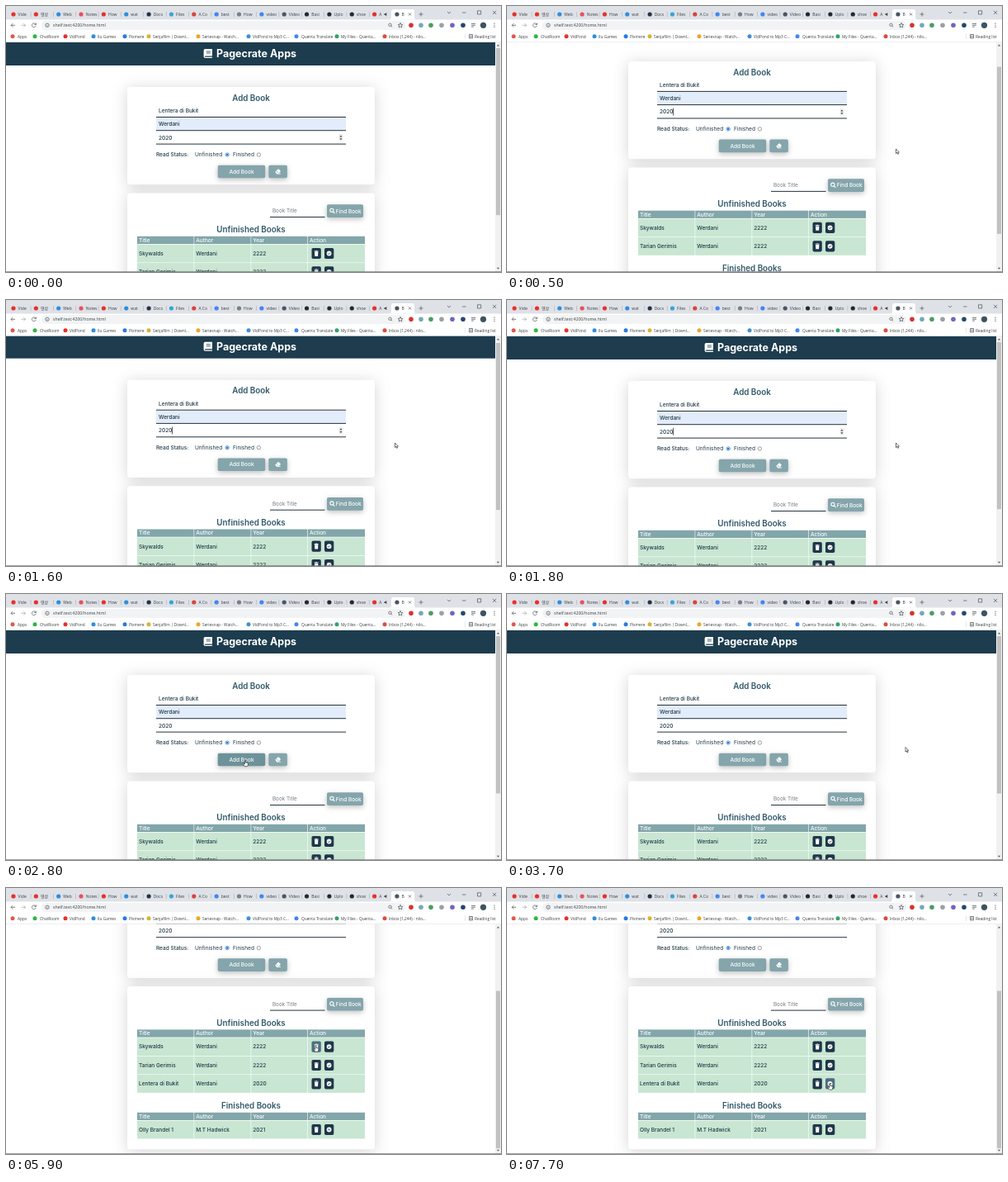
These frames come from a looping animation (600 by 322 pixels, 8 s). An HTML page:

```html
<!DOCTYPE html>
<html lang="en">
<head>
<meta charset="utf-8">
<title>Book list</title>
<style>
  html, body { margin: 0; width: 100%; height: 100%; overflow: hidden; background: #fff; }
  svg { display: block; }
  text { white-space: pre; }
  #page { font-family: Inter, "Noto Sans", sans-serif; font-size: 6.5px; font-weight: 500; fill: #1f3846; }
  #chrome { font-family: "Open Sans", "Noto Sans CJK KR", "Noto Sans CJK", sans-serif; font-size: 5px; fill: #3c4043; }
  .card { fill: #fff; filter: drop-shadow(0 2px 9px rgba(0, 0, 0, .17)); }
  .title { font-size: 9.8px; font-weight: 600; fill: #32596a; text-anchor: middle; }
  .light { fill: #fff; }
  .main rect { fill: #84a5ab; filter: drop-shadow(0 2px 3px rgba(0, 0, 0, .25)); }
  .main.hot rect { fill: #6d9299; }
  .small rect { fill: #1f364a; }
  .small.hot rect { fill: #4c6f80; }
  .line { fill: none; stroke: #5f6368; stroke-width: .8; }
  #cursor { pointer-events: none; }
</style>
</head>
<body>
<svg id="stage" width="600" height="322" viewBox="0 0 600 322" xmlns="http://www.w3.org/2000/svg"></svg>
<script>
const LOOP = 8000, ROW = 22.4, TOP = 43.5, VIEW = 278, BASE_SCROLL = 85;
const ADDED_AT = 2700;

const rect = (x, y, w, h, fill, extra = '') =>
  `<rect x="${x}" y="${y}" width="${w}" height="${h}" fill="${fill}" ${extra}/>`;
const text = (x, y, s, extra = '') => `<text x="${x}" y="${y}" ${extra}>${s}</text>`;
const dot = (x, y, r, fill, extra = '') => `<circle cx="${x}" cy="${y}" r="${r}" fill="${fill}" ${extra}/>`;
const path = (d, extra = 'class="line"') => `<path d="${d}" ${extra}/>`;
const button = (x, y, w, h, kind, inner) =>
  `<g class="btn ${kind}">${rect(x, y, w, h, '', 'rx="1.8"')}${inner}</g>`;

// Book page
const trash = (x, y) => `<g transform="translate(${x} ${y})" fill="#fff">
  <path d="M-2.5-3.1h1.6l.3-.5h1.2l.3.5h1.6v.8h-5zM-2.2-1.9h4.4l-.3 4.8q0 .5-.6.5h-2.6q-.6 0-.6-.5z"/></g>`;
const badge = (x, y, mark) => dot(x, y, 2.9, '#fff') +
  path(`M${x} ${y}${mark}`, 'fill="none" stroke="#1f364a" stroke-width=".9"');
const CHECK = 'm-1.5 0l1.1 1.1l1.9-2', CROSS = 'm-1.1-1.1l2.2 2.2m0-2.2l-2.2 2.2';

const columns = [[159, 68.6], [228.2, 68.4], [297.2, 68.2], [366, 69]];
const cells = (y, h, fill, values, baseline, extra) => columns.map(([x, w], i) =>
  rect(x, y, w, h, fill) + text(x + 2, y + baseline, values[i] ?? '', extra)).join('');
const tableHead = y => cells(y, 9.2, '#82a6aa', ['Title', 'Author', 'Year', 'Action'], 7, 'class="light"');
const bookRow = (y, book, mark) => cells(y, 21.8, '#c8e6d2', book, 13.2) +
  button(370.5, y + 4.2, 11.3, 13.2, 'small', trash(376.2, y + 10.8)) +
  button(386, y + 4.2, 11.3, 13.2, 'small', badge(391.6, y + 10.8, mark));

const radio = (x, on) => dot(x, 180, 2.2, '#fff', `stroke="${on ? '#2374d9' : '#777'}" stroke-width=".7"`) +
  (on ? dot(x, 180, 1.3, '#2374d9') : '');
const field = (y, value) => text(185, y, value) + rect(182, y + 5, 230, 1, '#26343c');

const page = `<g id="page">
  ${rect(0, 44, 593, 28, '#1d3c4e')}
  <path d="M241.5 52h8.5v8.6h-8.2q-.9 0-.9.6t.9.6h8.2v1.2h-8.5q-1.9 0-1.9-1.8v-7.2q0-2 1.9-2z" fill="#fff"/>
  ${path('M242.8 55h5M242.8 57h5', 'stroke="#1d3c4e" stroke-width=".8"')}
  ${text(255, 62.4, 'Pagecrate Apps', 'class="light" style="font-size:12.5px;font-weight:700"')}
  ${rect(147, 98, 300, 118.3, '#fff', 'rx="4" class="card"')}
  ${text(297, 114.8, 'Add Book', 'class="title"')}
  ${rect(182, 135, 230, 16, '#e3ecfa')}
  ${field(129, 'Lentera di Bukit')}${field(145.2, 'Werdani')}${field(161.6, '2020')}
  <g id="spinner">${rect(403.5, 155, 5, 8.6, '#eee')}
    <path d="M404.4 158.5l1.5-2 1.5 2zM404.4 160.3l1.5 2 1.5-2z" fill="#444"/></g>
  ${rect(201.3, 154.7, .7, 9, '#111', 'id="caret"')}
  ${text(182, 182.3, 'Read Status:')}${text(229, 182.3, 'Unfinished', 'font-weight="400"')}${radio(268.2, true)}
  ${text(275, 182.3, 'Finished', 'font-weight="400"')}${radio(306.4, false)}
  ${button(256.7, 192.7, 57.5, 15.6, 'main', text(285.5, 202.8, 'Add Book', 'class="light" text-anchor="middle"'))}
  ${button(318.3, 192.7, 22.6, 15.6, 'main',
    '<path d="M326.3 200.8l3.3-3.3q.5-.5 1 0l2 2q.5.5 0 1l-2 2h2.2v.9h-4.6z" fill="#fff"/>' +
    path('M327.6 199.6l3 3', 'stroke="#84a5ab" stroke-width=".7"'))}
  ${rect(147, 226.5, 300, 174.7, '#fff', 'rx="4" class="card" id="listCard"')}
  ${text(323, 250.3, 'Book Title', 'style="font-size:6.3px;font-weight:400;fill:#727a80"')}
  ${rect(320, 255, 66.5, 1, '#26343c')}
  ${button(389, 240.3, 44, 15.7, 'main',
    path('M396.6 249.2l1.8 1.8M397 247.3a2.1 2.1 0 1 0-4.2 0a2.1 2.1 0 1 0 4.2 0', 'fill="none" stroke="#fff" stroke-width="1.1"') +
    text(399.8, 250.5, 'Find Book', 'class="light"'))}
  ${text(297, 274.2, 'Unfinished Books', 'class="title"')}
  ${tableHead(278.8)}
  ${bookRow(288.7, ['Skywalds', 'Werdani', '2222'], CHECK)}
  ${bookRow(288.7 + ROW, ['Tarian Gerimis', 'Werdani', '2222'], CHECK)}
  <g id="newBook">${bookRow(288.7 + 2 * ROW, ['Lentera di Bukit', 'Werdani', '2020'], CHECK)}</g>
  <g id="finished">
    ${text(297, 352, 'Finished Books', 'class="title"')}
    ${tableHead(356.8)}
    ${bookRow(366.7, ['Olly Brandel 1', 'M.T Hadwick', '2021'], CROSS)}
  </g>
</g>`;

// Browser frame
const RED = '#e8302a', BLUE = '#2d8ee0', INK = '#24292e', GREY = '#7a7f85';
const tabs = [['Vide', RED], ['영상', RED], ['Web', BLUE], ['Notes', '#e8505b'], ['How', RED], ['wat', BLUE],
  ['Docs', '#243447'], ['Files', '#35a5d8'], ['A Co', '#d9433c'], ['best', '#4285f4'], ['How', GREY], ['video', '#4285f4'],
  ['Video', '#4b5563'], ['Basi', INK], ['Uplo', INK], ['shoe', INK], ['A', RED], ['B', '#4b5563']];
const bookmarks = [[8, 14, 'Apps', '#e2574c'], [35, 41, 'ChatRoom', '#2bb741'], [72, 77, 'VidPond', RED],
  [106, 111, 'Ilu Games', BLUE], [144, 149, 'Pixmere', '#2779e5'], [173, 178, 'Senjafilm | Downl...', '#d8b13a'],
  [233, 238, 'Seriesnap - Watch...', '#eda52c'], [294, 299, 'VidPond to Mp3 C...', '#3f8fd4'],
  [352, 358, 'Quenta Translate', '#4285f4'], [401, 406, 'My Files - Quenta...', '#32a467'], [459, 464, 'Inbox (1,244) - nilo...', '#dc4a3d']];
const extensions = [[491, '#d8322f'], [503, '#74a8bd'], [515, '#4b9d63'], [528, '#9aa0a6'], [541, '#6d65c6'], [554, '#24486c']];

const chrome = `<g id="chrome">
  ${rect(0, 0, 600, 17, '#dee1e6')}${rect(0, 16.5, 600, 27, '#fff')}
  <path d="M464 16.6q3 0 3-3v-7q0-2.5 2.5-2.5h23q2.5 0 2.5 2.5v7q0 3 3 3z" fill="#fff"/>
  ${tabs.map(([label, color], i) => {
    const x = 9 + i * 27.35;
    return dot(x, 10, 2.6, color) + text(x + 5.6, 12, label) +
      (i < 16 ? rect(x + 20.8, 7, .5, 6, '#a5a9ae') : '');
  }).join('')}
  <path d="M458.5 9.2h1.2l1.6-1.3v4.4l-1.6-1.3h-1.2z" fill="#444"/>
  ${path('M488 8.5l3 3m0-3l-3 3M503 7.5v5M500.5 10h5M535 7l2 2 2-2M553 8h4.5M571.5 5.8h4.2v4.2h-4.2zM590 5.8l4.2 4.2m0-4.2l-4.2 4.2')}
  ${rect(43, 18, 441, 11, '#f1f3f4', 'rx="5.5"')}
  ${path('M11 23.3h-5m2.2-2.2l-2.2 2.2 2.2 2.2')}
  ${path('M18.5 23.3h5m-2.2-2.2l2.2 2.2-2.2 2.2', 'class="line" opacity=".5"')}
  ${path('M36 22.2a2.4 2.4 0 1 0 .2 1.7M36.4 20.5v2h-2')}
  ${dot(50, 23.3, 2.2, 'none', 'class="line"')}${rect(49.65, 22.9, .7, 1.5, '#5f6368')}
  ${text(57, 25.3, 'shelf.test:4200/home.html', 'style="font-size:5.2px"')}
  ${dot(465.5, 22.8, 1.7, 'none', 'class="line"')}${path('M466.7 24l1.4 1.4')}
  ${path('M478 20.4l.8 2 2.1.1-1.6 1.4.5 2.1-1.8-1.2-1.8 1.2.5-2.1-1.6-1.4 2.1-.1z')}
  ${extensions.map(([x, color]) => dot(x, 23.3, 2.8, color)).join('')}
  ${path('M564 21.5h5M564 23.3h5M564 25.1h3')}
  ${dot(578.5, 23.3, 3.6, '#3c5360')}
  ${[21.2, 23.3, 25.4].map(y => dot(592, y, .65, '#5f6368')).join('')}
  ${bookmarks.map(([x, tx, label, color]) => dot(x, 36.7, 2.5, color) + text(tx, 38.6, label, 'style="font-size:4.8px"')).join('')}
  ${rect(556.5, 33.5, .5, 6.5, '#c8ccd0')}
  ${path('M561.5 34.5h4v4.5h-4zM562.5 36h2M562.5 37.5h2')}${text(568, 38.6, 'Reading list', 'style="font-size:4.8px"')}
  ${rect(0, 43, 600, .5, '#dcdfe2')}
  ${rect(593, TOP, 7, 278.5, '#f1f1f1')}
  <path d="M594.8 48.5l1.7-2 1.7 2zM594.8 316.8l1.7 2 1.7-2z" fill="#606060"/>
  ${rect(594, 51, 5, 200, '#c1c1c1', 'id="thumb"')}
  ${rect(0, 321.3, 600, .7, '#777')}
</g>`;

const cursor = `<g id="cursor" stroke="#111" stroke-width=".6" fill="#fff" stroke-linejoin="round">
  <path id="arrow" d="M0 0v5.6l1.3-1.2.9 2 .9-.4-.9-1.9h1.7z"/>
  <path id="hand" d="M-.6.4q.6-.8 1.2 0v2.5l2.3.6q.7.2.6 1l-.4 2q-.2 1.2-1.3 1.2h-1.9q-.7 0-1.1-.7l-1.6-2.4q.5-1 1.4-.1l.8.6z"/>
</g>`;

stage.innerHTML = page + chrome + cursor;
const $ = id => document.getElementById(id);
const buttons = [...document.querySelectorAll('.btn')];

// Keys are [time, ...values]; ease shapes each segment.
const smooth = u => u * u * (3 - 2 * u);
const easeOut = u => 1 - (1 - u) ** 3;
function track(keys, t, ease) {
  let i = keys.findIndex(k => k[0] > t);
  if (i < 0) return keys.at(-1).slice(1);
  if (i === 0) return keys[0].slice(1);
  const [a, b] = [keys[i - 1], keys[i]];
  const u = ease((t - a[0]) / (b[0] - a[0]));
  return a.slice(1).map((v, n) => v + (b[n + 1] - v) * u);
}
const scrollKeys = [[470, 0], [690, BASE_SCROLL], [1150, BASE_SCROLL], [1750, 0],
  [3960, 0], [4150, BASE_SCROLL + ROW]];
const cursorKeys = [[100, 600, 335], [320, 471.5, 173], [1950, 471.5, 173], [2500, 290, 201], [3150, 290, 201],
  [3650, 483, 185.5], [4780, 483, 185.5], [5120, 225, 238], [5300, 166, 240], [5500, 230, 288], [5850, 375.5, 190.5],
  [6000, 375.5, 190.5], [6250, 391, 191], [6550, 391, 288], [6850, 391, 288], [7200, 376, 237], [7450, 391.5, 236.5]];

function draw(t) {
  const added = t >= ADDED_AT;
  const shift = added ? ROW : 0;
  const [scroll] = track(scrollKeys, t, easeOut);
  const [x, y] = track(cursorKeys, t, smooth);
  const pageHeight = VIEW + BASE_SCROLL + shift;

  $('page').setAttribute('transform', `translate(0 ${-scroll})`);
  $('newBook').style.display = added ? '' : 'none';
  $('finished').setAttribute('transform', `translate(0 ${shift})`);
  $('listCard').setAttribute('height', 174.7 + shift);
  $('spinner').style.display = added ? 'none' : '';
  $('caret').style.display = !added && t % 1000 >= 500 ? '' : 'none';
  $('thumb').setAttribute('y', 51 + 264 * scroll / pageHeight);
  $('thumb').setAttribute('height', 264 * VIEW / pageHeight);

  const hovered = document.elementFromPoint(x, y)?.closest('.btn');
  buttons.forEach(b => b.classList.toggle('hot', b === hovered));
  $('cursor').setAttribute('transform', `translate(${x} ${y})`);
  $('arrow').style.display = hovered ? 'none' : '';
  $('hand').style.display = hovered ? '' : 'none';
}

const start = performance.now();
function frame() {
  draw((performance.now() - start) % LOOP);
  requestAnimationFrame(frame);
}
frame();
</script>
</body>
</html>
```
